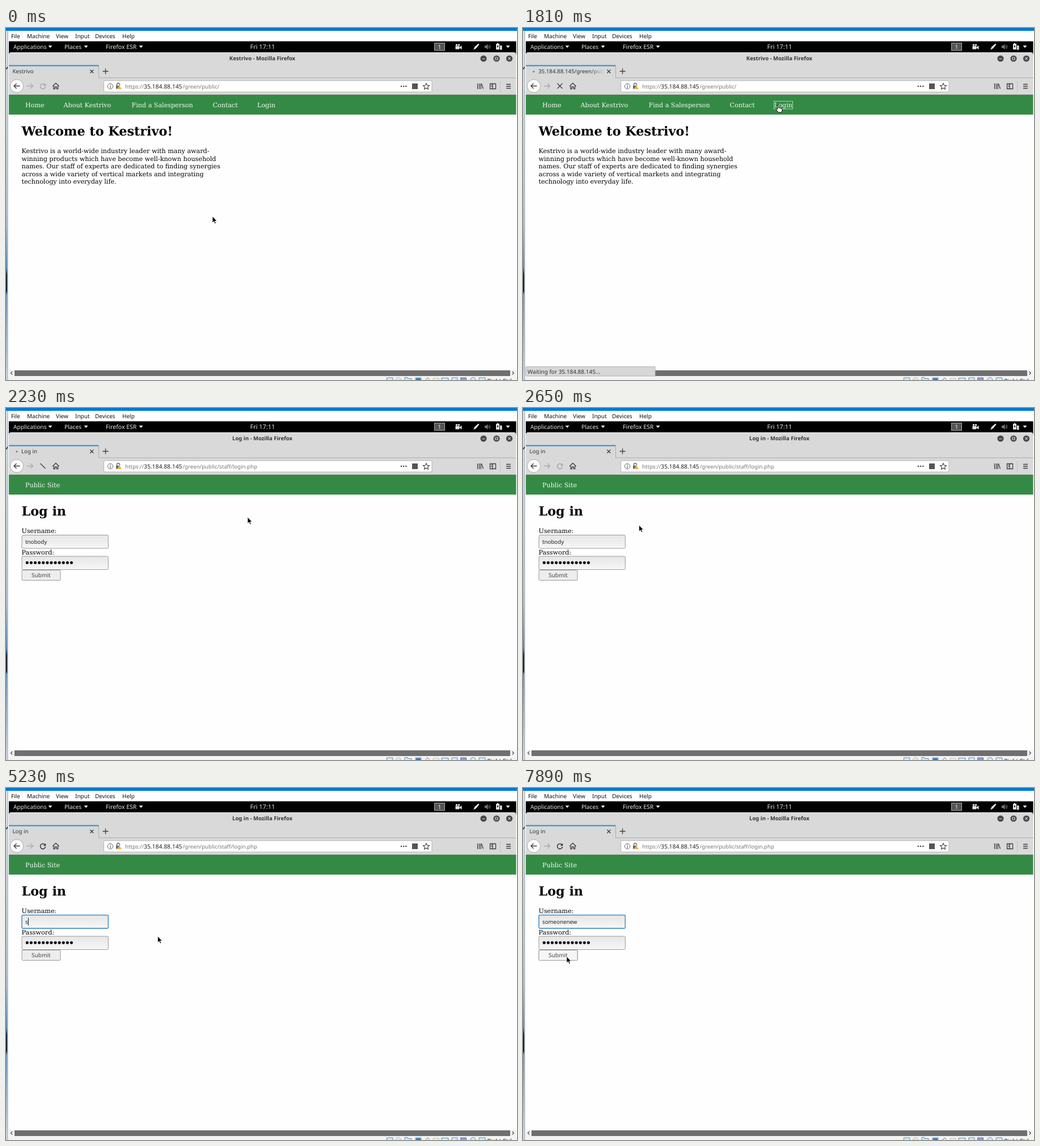
Animation, 901 px wide and 622 px high, one loop 8000 ms. Source, as an HTML page:

```html
<!DOCTYPE html>
<html lang="en">
<head>
<meta charset="utf-8">
<title>Login walkthrough</title>
<style>
  html, body { margin: 0; width: 100%; height: 100%; overflow: hidden; background: #fefefe; }
  svg { display: block; width: 100vw; height: 100vh; }
  text { font: 9.75px "Noto Sans", "Open Sans", sans-serif; text-rendering: geometricPrecision; white-space: pre; }
  .menu text { font-size: 10px; fill: #111; }
  .panel text { font-size: 10.2px; fill: #e6e6e6; }
  .title { font-size: 9.5px; font-weight: 700; fill: #333; text-anchor: middle; }
  .ui { fill: #333; }
  .url { fill: #777; font-size: 9.65px; }
  .page text { font: 11.15px "DejaVu Serif", serif; fill: #000; }
  .page .nav { fill: #f4faf5; }
  .page .h1 { font-size: 22.3px; font-weight: 700; }
  .page .field { font: 9.72px "Noto Sans", "Open Sans", sans-serif; fill: #222; }
  .line { fill: none; stroke: #3c3c3c; stroke-width: 1.3; }
</style>
</head>
<body>
<svg viewBox="0 0 901 622" preserveAspectRatio="none">
  <defs>
    <linearGradient id="desk" x2="0" y2="1">
      <stop offset="0" stop-color="#dfe5ea"/><stop offset=".3" stop-color="#c3ced8"/>
      <stop offset=".55" stop-color="#a9bccb"/><stop offset=".68" stop-color="#5c87ac"/>
      <stop offset=".7" stop-color="#10243a"/><stop offset=".745" stop-color="#0d1b2b"/>
      <stop offset=".755" stop-color="#6f93b3"/><stop offset="1" stop-color="#cbd5de"/>
    </linearGradient>
    <linearGradient id="input" x2="0" y2="1">
      <stop offset="0" stop-color="#e6e6e6"/><stop offset=".5" stop-color="#eee"/><stop offset="1" stop-color="#f7f7f7"/>
    </linearGradient>
    <clipPath id="tabText"><path d="M6 68H143V87H6z"/></clipPath>
    <clipPath id="tabRest"><path d="M70.5 68H143V87H70.5z"/></clipPath>
    <linearGradient id="fade"><stop offset="0" stop-color="#d9d9d9" stop-opacity="0"/><stop offset="1" stop-color="#d9d9d9"/></linearGradient>
    <g id="reload" fill="none" stroke="currentColor" stroke-width="1.5">
      <path d="M68.7 100.2A4.6 4.6 0 1 0 69.6 104"/>
      <path d="M70.2 97.8V102.2H65.8z" fill="currentColor" stroke="none"/>
    </g>
    <path id="drop" d="M-3.5-2H3.5L0 2.3z"/>
  </defs>

  <!-- host window -->
  <rect width="901" height="622" fill="#fefefe"/>
  <rect y="5" width="2.4" height="617" fill="url(#desk)"/>
  <path d="M3 5V622" stroke="#8999a6" stroke-width="1"/>
  <path d="M0 73L3 69" stroke="#222" stroke-width="1.5"/>
  <rect width="901" height="5" fill="#0078d7"/>
  <g class="menu">
    <text x="9" y="18.4">File</text><text x="37" y="18.4">Machine</text><text x="88" y="18.4">View</text>
    <text x="122" y="18.4">Input</text><text x="157" y="18.4">Devices</text><text x="205" y="18.4">Help</text>
  </g>

  <!-- desktop panel -->
  <rect x="5" y="23.5" width="894.5" height="24" fill="#000"/>
  <g class="panel">
    <text x="13" y="36.8">Applications</text><text x="103" y="36.8">Places</text>
    <text x="176" y="36.8" style="font-size:10.5px">Firefox ESR</text>
    <text x="430.5" y="36.8" style="font-size:10.9px">Fri 17:11</text>
    <g fill="#e6e6e6">
      <use href="#drop" x="78" y="33"/><use href="#drop" x="141" y="33"/><use href="#drop" x="238" y="33"/><use href="#drop" x="885" y="33"/>
    </g>
    <rect x="755.5" y="26.5" width="18" height="13" fill="#555" stroke="#aaa"/><text x="761.5" y="36.8">1</text>
    <g fill="#e6e6e6">
      <rect x="792.5" y="32" width="7" height="5.5"/><circle cx="794.5" cy="30" r="1.8"/><circle cx="798.5" cy="30" r="1.8"/><path d="M799 34.5L803.5 31V38z"/>
      <path d="M824 38.5L826.5 33L833 27.5L834.5 29L829 36z"/>
      <path d="M864 28H870V38H864z"/><path d="M866 26.5H868V28H866z"/><path d="M871 31H874.5V38.5H871z"/>
    </g>
    <path d="M866 31H868V34H866z" fill="#222"/>
    <path d="M844 31.2H846.5L849.5 28.5V38L846.5 35.3H844z" fill="#777"/>
    <path d="M851 31Q852.5 33 851 35.5M852.5 29.5Q855 33 852.5 37" fill="none" stroke="#777"/>
  </g>

  <!-- browser frame -->
  <path d="M5 117V47Q5 43 9 43H895.5Q899.5 43 899.5 47V117z" fill="#d9d9d9"/>
  <path d="M8 43.5H896" stroke="#f0f0f0"/>
  <text class="title" x="452" y="57.2" data-on="0 2230">Kestrivo - Mozilla Firefox</text>
  <text class="title" x="452" y="57.2" data-on="2230 8000">Log in - Mozilla Firefox</text>
  <g fill="#484848"><circle cx="842" cy="54" r="5.6"/><circle cx="865" cy="54" r="5.6"/><circle cx="887.5" cy="54" r="5.6"/></g>
  <path d="M839.5 54.5H844.5M863 52H867V56H863zM885.5 52L889.5 56M889.5 52L885.5 56" fill="none" stroke="#ddd" stroke-width="1.2"/>
  <rect x="5" y="65.5" width="158.5" height="2" fill="#2a8dd4"/>
  <path d="M163.5 66V88H899.5" fill="none" stroke="#aaa"/>
  <path d="M148.3 73.8L154.3 79.8M154.3 73.8L148.3 79.8M170.5 76.5H180.5M175.5 71.5V81.5" class="line"/>
  <g clip-path="url(#tabText)">
    <text class="ui" x="11.5" y="80.4" data-on="0 1690">Kestrivo</text>
    <circle cx="19" cy="77" r="1.6" fill="#777" data-on="1690 2380"/>
    <text class="ui" x="27" y="80.4" data-on="1690 2080">35.184.88.145/green/pub</text>
    <text class="ui" x="27" y="80.4" data-on="2080 2230" clip-path="url(#tabRest)">35.184.88.145/green/pub</text>
    <rect x="118" y="69" width="26" height="17" fill="url(#fade)" data-on="1690 2230"/>
    <text class="ui" x="27" y="80.4" data-on="2080 2380">Log in</text>
    <text class="ui" x="11.5" y="80.4" data-on="2380 8000">Log in</text>
  </g>

  <!-- toolbar -->
  <path d="M5 117.5H899.5" stroke="#bbb"/>
  <circle cx="19" cy="102.5" r="11.6" fill="#fbfbfb" stroke="#aaa"/>
  <path d="M24.5 102.5H14M18.5 98L14 102.5L18.5 107" class="line" stroke-width="1.6"/>
  <path d="M37 102.5H47.5M43 98L47.5 102.5L43 107" class="line" style="stroke:#aaa"/>
  <use href="#reload" color="#a6a6a6" data-on="0 150 2380 3130"/>
  <use href="#reload" color="#333" data-on="150 1690 3130 8000"/>
  <path d="M60.5 98L69.5 107M69.5 98L60.5 107" class="line" data-on="1690 2080"/>
  <path d="M60.5 98L69.5 107" class="line" data-on="2080 2380"/>
  <path d="M82 103L87.8 97.5L93.6 103M84 102.5V107.5H86.3V104H89.3V107.5H91.6V102.5" class="line"/>
  <rect x="172.5" y="93" width="578.5" height="20" rx="2.5" fill="#fff" stroke="#b4b4b4"/>
  <circle cx="184" cy="103" r="4.7" class="line" style="stroke:#666;stroke-width:1"/>
  <path d="M184 102.3V106M184 100V101.3" class="line" style="stroke:#666"/>
  <path d="M195.5 102V100A2.5 2.5 0 0 1 200.5 100V102" class="line" style="stroke:#666"/>
  <rect x="194" y="101.8" width="7" height="5.7" fill="#666"/>
  <path d="M200.3 101.5L204.3 108.3H196.3z" fill="#f0b02c" stroke="#fff" stroke-width=".5"/>
  <text class="url" x="210" y="106.6">https://</text>
  <text class="url" x="243" y="106.6" style="font-size:10.35px;fill:#222">35.184.88.145</text>
  <text class="url" x="311.5" y="106.6" data-on="0 1960">/green/public/</text>
  <text class="url" x="311.5" y="106.6" data-on="1960 8000">/green/public/staff/login.php</text>
  <g fill="#444"><circle cx="697" cy="103" r="1.3"/><circle cx="701.2" cy="103" r="1.3"/><circle cx="705.4" cy="103" r="1.3"/></g>
  <rect x="716" y="98" width="10" height="10" fill="#555"/>
  <path d="M741 97.6L742.6 101.3L746.5 101.7L743.6 104.4L744.4 108.2L741 106.2L737.6 108.2L738.4 104.4L735.5 101.7L739.4 101.3z" class="line" style="stroke-width:1.1"/>
  <path d="M831.5 98V108M834.5 98V108M837.2 98V108M838.5 98.5L841.5 107.5M853.5 98.5H863.5V107.5H853.5zM858 98.5V107.5M882 99.5H890M882 103H890M882 106.5H890" class="line"/>
  <path d="M855 101H857M855 103.5H857" class="line" style="stroke-width:1"/>
  <path d="M871.5 94V113" stroke="#c4c4c4"/>

  <!-- web page -->
  <rect x="5" y="118" width="894.5" height="35" fill="#348a45"/>
  <g class="page" data-on="0 2230">
    <text class="nav" x="34" y="139.8">Home</text><text class="nav" x="101.5" y="139.8">About Kestrivo</text>
    <text class="nav" x="221.5" y="139.8">Find a Salesperson</text><text class="nav" x="364.5" y="139.8">Contact</text>
    <text class="nav" x="443" y="139.8">Login</text>
    <rect x="442.5" y="129.5" width="33" height="13.5" fill="none" stroke="#cfe5d3" stroke-width=".8" data-on="1690 2230"/>
    <text class="h1" x="27.5" y="190">Welcome to Kestrivo!</text>
    <text x="27.5" y="221">Kestrivo is a world-wide industry leader with many award-</text>
    <text x="27.5" y="234.6">winning products which have become well-known household</text>
    <text x="27.5" y="248.1">names. Our staff of experts are dedicated to finding synergies</text>
    <text x="27.5" y="261.7">across a wide variety of vertical markets and integrating</text>
    <text x="27.5" y="275.2">technology into everyday life.</text>
  </g>
  <g class="page" data-on="2230 8000">
    <text class="nav" x="34" y="139.8">Public Site</text>
    <text class="h1" x="27.5" y="190">Log in</text>
    <text x="27.5" y="221">Username:</text><text x="27.5" y="258.6">Password:</text>
    <g fill="url(#input)" stroke="#9a9a9a">
      <rect x="28" y="224.5" width="152.3" height="23.5" rx="2"/>
      <rect x="28" y="262" width="152.3" height="23.5" rx="2"/>
      <rect x="28" y="286.5" width="68" height="18" rx="1.5" fill="#ededed"/>
    </g>
    <rect x="28" y="286.5" width="68" height="18" rx="1.5" fill="#f6f6f6" stroke="#9a9a9a" data-on="7770 8000"/>
    <rect x="28" y="224.5" width="152.3" height="23.5" rx="2" fill="none" stroke="#3c8fd0" stroke-width="1.3" data-on="3280 8000"/>
    <rect x="34" y="229" width="38" height="14" fill="#1b86cb" data-on="3400 5230"/>
    <text class="field" x="34" y="239.8" data-on="2230 3400">tnobody</text>
    <text class="field" x="34" y="239.8" style="fill:#fff" data-on="3400 5230">tnobody</text>
    <text class="field" x="34" y="239.8" id="typed"></text>
    <path id="caret" d="M.7 229.5V243" stroke="#111" data-on="5230 7770"/>
    <path d="M37.3 273.3H118" stroke="#111" stroke-width="5.2" stroke-linecap="round" stroke-dasharray="0 7.1"/>
    <text class="field" x="45" y="299.2" style="font-size:10.1px;fill:#444">Submit</text>
  </g>

  <!-- scrollbar and status -->
  <rect x="5" y="604" width="894.5" height="12" fill="#f3f3f3"/>
  <rect x="15" y="605" width="874" height="10" fill="#6f6f6f"/>
  <path d="M11.3 607L8.5 609.8L11.3 612.6M892.5 607L895.3 609.8L892.5 612.6" class="line" style="stroke-width:1.1"/>
  <g data-on="1570 1690">
    <path d="M5 598.5H262.5V615H5z" fill="#d7d7d7" stroke="#b5b5b5"/>
    <text class="ui" x="8" y="610.5">https://35.184.88.145/green/public/staff/login.php</text>
  </g>
  <g data-on="1690 2230">
    <path d="M5 598.5H233V615H5z" fill="#d7d7d7" stroke="#b5b5b5"/>
    <text class="ui" x="8" y="610.5" style="font-size:10px">Waiting for 35.184.88.145...</text>
  </g>
  <rect x="4" y="616" width="897" height="6" fill="#f4f4f4"/>
  <g stroke-width="1">
    <g fill="#dceaf5" stroke="#4a8fc0">
      <path d="M671.5 623V618H682V623zM703 623V617.5H708V619.5H715V623zM722 623V618H732V623zM768 623V618.5H780V623zM786 623V618H796V623zM834 623V618H845V623z"/>
      <circle cx="823.5" cy="622" r="4.5"/>
    </g>
    <path d="M723 619H731V622H723z" fill="#2f78c0"/>
    <path d="M801.5 623V618H811.5V623z" fill="#9a9ad8" stroke="#6668b4"/>
    <circle cx="692" cy="622" r="4.5" fill="#e5e5e5" stroke="#bbb"/>
    <path d="M739 623L743 618L747 621" fill="none" stroke="#777"/>
    <path d="M753 623V619H763V623z" fill="#eee" stroke="#bbb"/>
  </g>
  <text x="848.5" y="627" style="font-size:9.8px" fill="#222">Right Ctrl</text>

  <g id="pointer">
    <path data-kind="arrow" d="M0 0V11L2.6 8.7L4.4 12.8L6.2 12L4.4 8.1H7.8z" fill="#000" stroke="#fff" stroke-width=".7"/>
    <path data-kind="beam" d="M-2-6H2M0-6V6M-2 6H2" fill="none" stroke="#111"/>
    <path data-kind="hand" d="M0 0Q1.4-1.2 2 .5V5L7 6Q8.5 6.5 8 9L7 13H1L-3 7.5Q-2.6 6 0 7.5z" fill="#fff" stroke="#000" stroke-width=".9"/>
  </g>
</svg>

<script>
  const LOOP = 8000;
  const USER = 'someonenew';
  const moves = [
    [0, 364, 333, 'arrow'], [150, 372, 312, 'arrow'], [280, 374, 284, 'arrow'], [420, 362, 232, 'arrow'],
    [550, 343, 169, 'arrow'], [690, 342, 160, 'arrow'], [820, 342, 154, 'arrow'], [970, 342, 152, 'arrow'],
    [1120, 332, 149, 'arrow'], [1270, 400, 149, 'arrow'], [1420, 435, 147, 'arrow'], [1570, 449, 136, 'hand'],
    [1960, 441, 158, 'arrow'], [2080, 426, 193, 'arrow'], [2530, 300, 201, 'arrow'], [2650, 204.5, 207, 'arrow'],
    [2770, 150, 212, 'arrow'], [2890, 110, 217, 'arrow'], [3010, 90, 220, 'arrow'], [3130, 82, 220, 'arrow'],
    [3280, 76, 238, 'beam'], [3400, 0, 0, 'none'], [3700, 36, 240, 'beam'], [3820, 45, 240, 'beam'],
    [3970, 170, 248, 'arrow'], [4090, 274, 257, 'arrow'], [4240, 267.5, 262, 'arrow'], [7500, 185, 268, 'arrow'],
    [7620, 100, 276, 'arrow'], [7770, 86, 291, 'arrow'], [7890, 77, 298, 'arrow']
  ];
  const typing = [[0, 0], [5230, 1], [5350, 2], [5470, 3], [5590, 4], [5740, 5], [5890, 6], [6480, 7], [6640, 8], [6790, 10]];

  const $ = id => document.getElementById(id);
  const pointer = $('pointer'), typed = $('typed'), caret = $('caret');
  const shapes = [...pointer.children];
  const timed = [...document.querySelectorAll('[data-on]')].map(el => ({ el, spans: el.dataset.on.split(' ').map(Number) }));

  // Latest entry that has started at time t.
  const at = (track, t) => track.filter(step => step[0] <= t).pop();
  // Spans alternate start and end, so an odd count of passed bounds means "on".
  const isOn = (spans, t) => spans.filter(bound => bound <= t).length % 2 === 1;

  function draw(t) {
    for (const { el, spans } of timed) el.style.display = isOn(spans, t) ? '' : 'none';
    const [, x, y, kind] = at(moves, t);
    pointer.setAttribute('transform', `translate(${x} ${y})`);
    for (const shape of shapes) shape.style.display = shape.dataset.kind === kind ? '' : 'none';
    const text = USER.slice(0, at(typing, t)[1]);
    if (typed.textContent !== text) typed.textContent = text;
    if (text) caret.setAttribute('transform', `translate(${34 + typed.getComputedTextLength()} 0)`);
  }

  const start = performance.now();
  function tick() {
    draw((performance.now() - start) % LOOP);
    requestAnimationFrame(tick);
  }
  tick();
</script>
</body>
</html>
```
